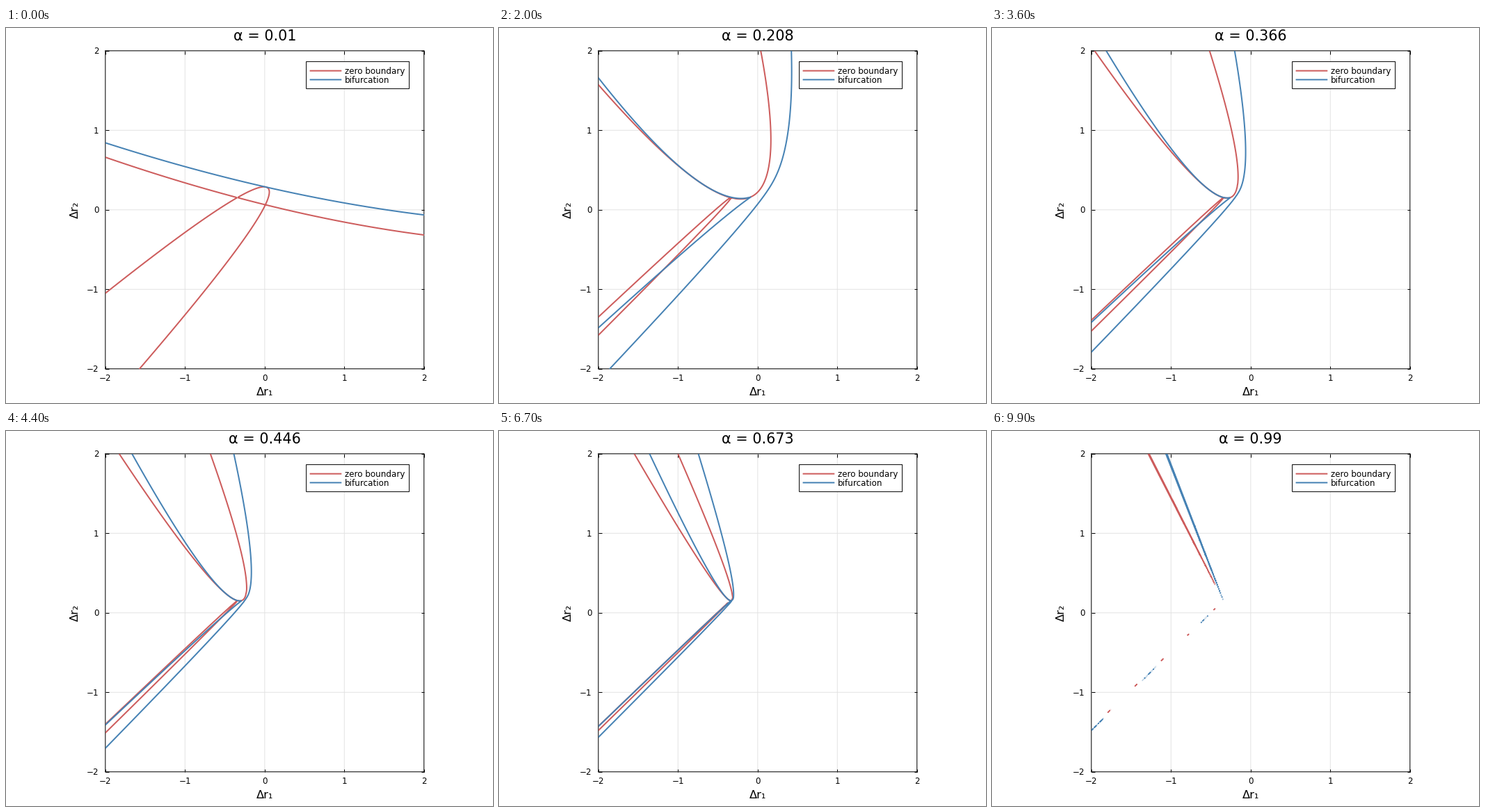
Write a matplotlib script that moves like this. It is 700 px wide and 540 px high and loops after 10000 ms.

```python
import matplotlib.pyplot as plt
import numpy as np
from matplotlib.animation import FuncAnimation
from matplotlib.lines import Line2D
from matplotlib.patches import Rectangle

W, H, DPI = 700, 540, 100
FRAMES, INTERVAL = 100, 100
LEFT, RIGHT, TOP, BOTTOM = 142.8, 600.8, 32.8, 490.8
RED, BLUE = "indianred", "steelblue"
PT = 72 / DPI

# Equilibria of r = (1-a) * linear(x, y) + a * quadratic(x, y), written in the
# basis of the two pure quadratic directions; r = 0 lies at ORIGIN.
ORIGIN = np.array([-0.343, 0.1536])
BASIS = np.array([[-0.508, -1.0], [1.0, -0.9696]])
G1, G2, MU1 = -0.4845, 0.0341, 0.200   # g = G1 x + G2 y + x^2 + MU1 x y
H1, H2, MU2 = -0.3393, 0.1107, 0.575   # h = H1 x + H2 y + y^2 + MU2 x y

axis = np.linspace(-2, 2, 401)
X, Y = np.meshgrid(axis, axis)
inv = np.linalg.inv(BASIS)
dx, dy = X - ORIGIN[0], Y - ORIGIN[1]
U = inv[0, 0] * dx + inv[0, 1] * dy
V = inv[1, 0] * dx + inv[1, 1] * dy


def zero_boundary(g, h):
    """Vanishes where an equilibrium has x = 0 or y = 0."""
    on_x = g - G1 * h / H1 - (h / H1) ** 2
    on_y = h - H2 * g / G2 - (g / G2) ** 2
    return on_x * on_y


def pencil():
    """Constant parts of det(t * C1 + C2) for the two conics."""
    b = np.array([MU1, MU2]) / 2
    d = np.array([G1, H1]) / 2
    f = np.array([G2, H2]) / 2
    t = np.array([1.0, 0.0])
    minor = np.polysub(t, np.polymul(b, b))
    rest = 2 * np.polymul(np.polymul(b, f), d)
    rest = np.polysub(rest, np.polymul(t, np.polymul(f, f)))
    rest = np.polysub(rest, np.polymul(d, d))
    return minor, rest


MINOR, REST = pencil()


def bifurcation(g, h):
    """Tact invariant: vanishes where two equilibria merge."""
    n2, n1, n0 = MINOR
    a = REST[0] - g * n2
    b = REST[1] - g * n1 - h * n2
    c = REST[2] - g * n0 - h * n1
    d = REST[3] - h * n0
    return (18 * a * b * c * d - 4 * b**3 * d + b**2 * c**2
            - 4 * a * c**3 - 27 * a**2 * d**2)


plt.rcParams["font.family"] = "DejaVu Sans"
plt.rcParams["path.simplify"] = False  # keeps the tiny loops near a = 1
fig = plt.figure(figsize=(W / DPI, H / DPI), dpi=DPI, facecolor="white")
ax = fig.add_axes([LEFT / W, 1 - BOTTOM / H,
                   (RIGHT - LEFT) / W, (BOTTOM - TOP) / H])
ax.set(xlim=(-2, 2), ylim=(-2, 2))
ticks = range(-2, 3)
ax.set_xticks(ticks)
ax.set_yticks(ticks)
ax.tick_params(direction="in", top=True, right=True, length=4.5 * PT,
               width=PT, labelbottom=False, labelleft=False)
ax.set_axisbelow(True)
ax.grid(color="#e3e3e3", linewidth=PT, snap=False)
for spine in ax.spines.values():
    spine.set(linewidth=PT, snap=False)


def text(x, y, s, px, **kw):
    kw = {"ha": "center", "va": "baseline", **kw}
    return fig.text(x / W, 1 - y / H, s, fontsize=px * PT, **kw)


def line(x0, x1, y, color):
    fig.add_artist(Line2D([x0 / W, x1 / W], [1 - y / H] * 2, color=color,
                          linewidth=2 * PT, zorder=6, snap=False))


for k in ticks:
    label = str(k).replace("-", "\u2212")
    pos = (k + 2) / 4
    text(LEFT + pos * (RIGHT - LEFT), 507.5, label, 11.87)
    text(133.5, BOTTOM - pos * (BOTTOM - TOP) + 4.6, label, 11.87, ha="right")

text(371.8, 528.8, "Δr₁", 16.3)
text(99, 261.8, "Δr₂", 16.3, rotation=90, va="center")
title = text(371.8, 18.3, "", 20.8)

fig.add_artist(Rectangle((431.6 / W, 1 - 87.4 / H), 148 / W, 39 / H,
                         facecolor="white", edgecolor="black",
                         linewidth=PT, zorder=5, snap=False))
for y, color, name in ((61.6, RED, "zero boundary"), (74.4, BLUE, "bifurcation")):
    line(437.6, 481.3, y, color)
    text(487, y + 4.5, name, 11.87, ha="left", zorder=6)

drawn = []


def update(i):
    while drawn:
        drawn.pop().remove()
    a = 0.01 + 0.98 * i / (FRAMES - 1)
    title.set_text(f"α = {round(a, 3):g}")
    # The whole diagram only scales about ORIGIN as a changes.
    scale = (1 - a) ** 2 / a
    g, h = U / scale, V / scale
    for func, color in ((zero_boundary, RED), (bifurcation, BLUE)):
        cs = ax.contour(X, Y, func(g, h), levels=[0], colors=[color],
                        linewidths=2 * PT, linestyles="solid", zorder=3)
        cs.set(joinstyle="round", capstyle="round", snap=False)
        drawn.append(cs)
    return drawn


anim = FuncAnimation(fig, update, frames=FRAMES, interval=INTERVAL,
                     repeat=True, repeat_delay=0, blit=False)
plt.show()
```
